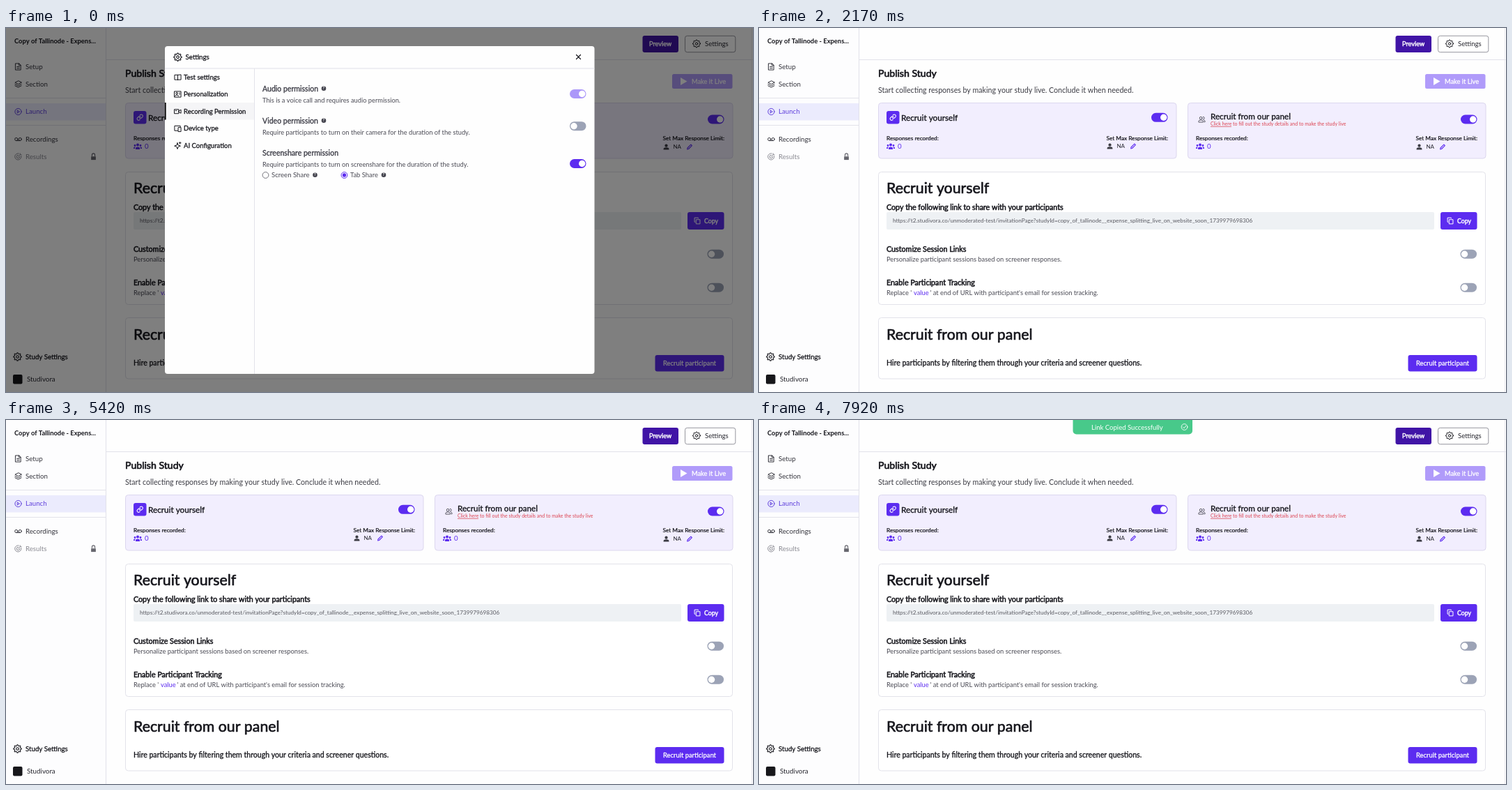
An HTML page with a canvas that plays this animation: 1072 px wide and 522 px high, repeating every 8 s.

```html
<!DOCTYPE html>
<html lang="en">
<head>
<meta charset="utf-8">
<title>Publish study</title>
<style>
html, body { margin: 0; width: 100%; height: 100%; overflow: hidden; background: #fff; }
canvas { display: block; width: 1072px; height: 522px; }
</style>
</head>
<body>
<canvas id="stage"></canvas>
<script>
const W = 1072, H = 522, LOOP = 8000, STEP = 1000 / 12;
const CLOSE_AT = 1500, COPY_AT = 6750, CLICK_MS = 330, TOAST_AT = 6795, TOAST_MS = 280;
const PURPLE = '#5c2cf0', INK = '#16161c', BODY = '#4a4a54', GREY = '#9ca3b6', LINE = '#e2e2ea';
const MEDIUM = 0.03, SEMI = 0.05;

const canvas = document.getElementById('stage');
const ctx = canvas.getContext('2d');
const ratio = window.devicePixelRatio || 1;
canvas.width = W * ratio;
canvas.height = H * ratio;

const ring = (x, y, r) => `M${x + r} ${y}a${r} ${r} 0 1 1 ${-2 * r} 0a${r} ${r} 0 1 1 ${2 * r} 0z`;

function gearPath() {
  let d = '';
  for (let i = 0; i < 32; i++) {
    const r = i % 4 < 2 ? 11 : 8.3;
    const a = (i - 0.5) * Math.PI / 16;
    d += `${i ? 'L' : 'M'}${12 + r * Math.cos(a)} ${12 + r * Math.sin(a)}`;
  }
  return d + 'z' + ring(12, 12, 3.5);
}

// Icon outlines on a 24 unit grid
const ICONS = {
  gear: gearPath(),
  doc: 'M4 2h11l5 5v15H4zM14 2v6h6M8 12h8M8 17h8',
  layers: 'M12 2L2 7l10 5 10-5zM2 12l10 5 10-5M2 17l10 5 10-5',
  launch: ring(12, 12, 10) + 'M10 8l6 4-6 4z',
  tape: ring(6, 12, 4.5) + ring(18, 12, 4.5) + 'M6 16.5h12',
  target: 'M21.5 10a10 10 0 1 1-8-8M17 12a5 5 0 1 1-5-5M12 12l7-7M18 2v4h4',
  shackle: 'M7 11V7a5 5 0 0 1 10 0v4',
  lockBody: 'M3 10h18v13H3z',
  link: 'M10 13a5 5 0 0 0 7.5.5l3-3a5 5 0 0 0-7-7l-1.7 1.7M14 11a5 5 0 0 0-7.5-.5l-3 3a5 5 0 0 0 7 7l1.7-1.7',
  group: ring(12, 7, 4) + ring(4, 9, 2.8) + ring(20, 9, 2.8) +
    'M6 20v-3q0-4 6-4t6 4v3zM0 18v-2q0-3 4-3h1q-1 2-1 5zM24 18v-2q0-3-4-3h-1q1 2 1 5z',
  pair: ring(9, 8, 4) + 'M2 20v-2q0-4 7-4t7 4v2zM16 4a4 4 0 0 1 0 8M18 14q4 1 4 4v2h-3',
  person: ring(12, 7, 6) + 'M1 23v-3q0-6 11-6t11 6v3z',
  pencil: 'M17 3l4 4L8 20l-5 1 1-5z',
  copy: 'M9 8h12v14H9zM5 16H3V2h12v2',
  cross: 'M4 4l16 16M20 4L4 20',
  book: 'M12 5H2v15h9l1 1 1-1h9V5zM12 5v16',
  badge: 'M2 3h20v18H2zM17 8h2M17 12h2' + ring(9, 9, 3) + 'M4 18q0-4 5-4t5 4',
  camera: 'M2 6h13v13H2zM15 11l7-4v11l-7-4zM5 10h3',
  devices: 'M12 19H2V4h18v3M14 9h8v13h-8z',
  sparkle: 'M11 4l2.5 7 7 2.5-7 2.5-2.5 7-2.5-7-7-2.5 7-2.5zM19 1v6M16 4h6',
  play: 'M3 1l19 11L3 23z',
  done: ring(12, 12, 10) + 'M7 12l4 4 6-8'
};

function icon(name, cx, cy, size, color, weight = 1, filled = false) {
  const k = size / 24, path = new Path2D(ICONS[name]);
  ctx.save();
  ctx.translate(cx - size / 2, cy - size / 2);
  ctx.scale(k, k);
  ctx.fillStyle = ctx.strokeStyle = color;
  ctx.lineWidth = weight / k;
  ctx.lineJoin = ctx.lineCap = 'round';
  if (filled) ctx.fill(path); else ctx.stroke(path);
  ctx.restore();
}

// y is the middle of the capitals; weight thickens the strokes, in em
function text(str, x, y, size, color = INK, weight = 0, face = '') {
  ctx.font = `${face} ${size}px Lato, "Open Sans", sans-serif`;
  ctx.fillStyle = ctx.strokeStyle = color;
  ctx.lineJoin = 'round';
  const base = y + size * 0.35;
  ctx.fillText(str, x, base);
  if (weight) {
    ctx.lineWidth = size * weight;
    ctx.strokeText(str, x, base);
  }
}

function box(x, y, w, h, r, fill, stroke) {
  ctx.beginPath();
  ctx.roundRect(x, y, w, h, r);
  if (fill) { ctx.fillStyle = fill; ctx.fill(); }
  if (stroke) { ctx.strokeStyle = stroke; ctx.lineWidth = 1; ctx.stroke(); }
}

function rect(x, y, w, h, color) {
  ctx.fillStyle = color;
  ctx.fillRect(x, y, w, h);
}

function disc(x, y, r, fill, stroke) {
  ctx.beginPath();
  ctx.arc(x, y, r, 0, 2 * Math.PI);
  if (fill) { ctx.fillStyle = fill; ctx.fill(); }
  if (stroke) { ctx.strokeStyle = stroke; ctx.lineWidth = 1; ctx.stroke(); }
}

function toggle(x, y, on, color = on ? PURPLE : GREY) {
  box(x, y - 6.5, 23.5, 13, 6.5, color);
  disc(x + (on ? 17.7 : 6), y, 4.7, '#fff');
}

function sidebar() {
  rect(0, 0, 143, H, '#fdfdfe');
  rect(143, 0, 1, H, LINE);
  rect(0, 100, 143, 1, LINE);
  rect(0, 139, 143, 1, LINE);
  rect(0, 108, 143, 24.5, '#ebebfd');
  text('Copy of Tallinode - Expens...', 12, 19, 9.4, INK, 0, 'bold');
  const rows = [
    ['doc', 'Setup', 55.5, '#34343c'], ['layers', 'Section', 80.5, '#34343c'],
    ['launch', 'Launch', 120, '#6040dc'], ['tape', 'Recordings', 159.5, '#34343c'],
    ['target', 'Results', 184.5, '#8a8a92']
  ];
  for (const [name, label, y, color] of rows) {
    icon(name, 17.5, y, 11, color);
    text(label, 28, y, 9.7, color);
  }
  icon('shackle', 125.5, 184, 10, '#66666e', 1.1);
  icon('lockBody', 125.5, 185, 9, '#66666e', 1, true);
  icon('gear', 16.5, 471.5, 12.5, INK, 1.1);
  text('Study Settings', 28, 471.5, 9.7, INK, MEDIUM);
  box(10, 497, 13.5, 13.5, 2, '#17171b');
  text('Studivora', 30, 503.5, 9.8, '#26262e');
}

function header() {
  rect(143, 45, 929, 1, LINE);
  rect(1070, 0, 1, H, '#e9e9ee');
  box(913.5, 11, 51.5, 24, 3, '#4014a6');
  text('Preview', 923, 22.5, 9.2, '#fff', SEMI);
  box(974.5, 11.3, 72.3, 23.4, 3, '#fff', '#96969e');
  icon('gear', 991, 22.5, 12, INK);
  text('Settings', 1003, 22.5, 9.65, '#26262e');
  text('Publish Study', 171, 65, 14.1, INK, SEMI);
  text('Start collecting responses by making your study live. Conclude it when needed.', 171, 89.5, 10.62, '#3c3c44');
  box(956, 66, 86.5, 21, 2.5, '#b09bfa');
  icon('play', 972.5, 76.5, 12, '#fff', 1, true);
  text('Make it Live', 984, 76.5, 9.25, '#fff', MEDIUM);
}

function card(x, toggleY, naY) {
  box(x + 0.5, 107.5, 427.5, 79.5, 4, '#f2eefe', '#dcd7ee');
  toggle(x + 392, toggleY, true);
  text('Responses recorded:', x + 12, 158.5, 8.27, INK, MEDIUM);
  icon('group', x + 18, 170, 12, PURPLE, 1, true);
  text('0', x + 28, 170, 9.7, PURPLE);
  text('Set Max Response Limit:', x + 327.5, 158, 8.25, INK, MEDIUM);
  icon('person', x + 332.5, naY, 8.5, '#3c3c44', 1, true);
  text('NA', x + 342.5, naY - 0.5, 8, '#26262e');
  icon('pencil', x + 366, naY, 9, PURPLE, 1.1);
}

function cards() {
  card(171, 128.3, 169.5);
  box(183, 119, 18.5, 18.5, 3, PURPLE);
  icon('link', 192.2, 128.2, 10.5, '#fff', 1.1);
  text('Recruit yourself', 204, 128.5, 11.75, INK, MEDIUM);
  card(615, 131, 170.5);
  icon('pair', 635.5, 131, 11, '#4a4a54', 0.9);
  text('Recruit from our panel', 648, 126.5, 11.7, INK, MEDIUM);
  const red = '#dc4450';
  text('Click here to fill out the study details and to make the study live', 648, 138, 6.99, red);
  rect(648, 141, 30, 0.7, red);
}

function option(title, note, y) {
  text(title, 183, y, 10.72, INK, SEMI);
  if (note) text(note, 183, y + 14, 9.33, BODY);
  toggle(1006.5, y + 6.7, false);
}

function panels() {
  box(171.5, 206.5, 871, 190, 4, '#fff', LINE);
  text('Recruit yourself', 183, 230, 21.3, INK, MEDIUM);
  text('Copy the following link to share with your participants', 183, 257.5, 10.69, INK, SEMI);
  box(183, 264, 786, 25, 2, '#eef1f4');
  text('https://t2.studivora.co/unmoderated-test/invitationPage?studyId=copy_of_tallinode__expense_splitting_live_on_website_soon_1739979698306',
    192, 276, 8.19, '#5a5a62');
  box(978, 264, 52.5, 25, 3, PURPLE);
  icon('copy', 992, 276.5, 10.5, '#fff');
  text('Copy', 1002, 276.5, 8.8, '#fff', SEMI);
  option('Customize Session Links', 'Personalize participant sessions based on screener responses.', 317.5);
  option('Enable Participant Tracking', '', 365.5);
  text("Replace '", 183, 379.5, 9.33, BODY);
  text('value', 222, 379.5, 9.33, PURPLE);
  text("' at end of URL with participant's email for session tracking.", 245.5, 379.5, 9.33, BODY);

  box(171.5, 415.5, 871, 87.5, 4, '#fff', LINE);
  text('Recruit from our panel', 183, 439.5, 21.3, INK, MEDIUM);
  text('Hire participants by filtering them through your criteria and screener questions.', 183, 480.5, 10.57, INK, MEDIUM);
  box(931.5, 469, 99, 23.5, 3, PURPLE);
  text('Recruit participant', 943, 481, 9.38, '#fff', MEDIUM);
}

function info(x, y) {
  disc(x, y, 3.3, '#45454f');
  text('?', x - 1.2, y, 5, '#fff', MEDIUM);
}

function permission(title, note, y, toggleY, on, color) {
  text(title, 368, y, 10.55, '#3a3a44', MEDIUM);
  text(note, 368, y + 16.3, 9.29, BODY);
  toggle(809, toggleY, on, color);
}

function modal() {
  rect(0, 0, W, H, 'rgba(0,0,0,.5)');
  box(228, 26, 616.5, 470, 4, '#fefefe');
  rect(228, 57.5, 616.5, 1, LINE);
  rect(356, 58, 1, 438, LINE);
  rect(228, 107, 128, 24.5, '#f5f5f7');
  rect(228, 107, 1.6, 24.5, '#000');
  icon('gear', 246.5, 41.7, 12.5, INK, 1.1);
  text('Settings', 257.5, 42, 9.8, INK, MEDIUM);
  icon('cross', 821.5, 41.5, 9, INK, 1.2);
  const tabs = [['book', 'Test settings'], ['badge', 'Personalization'], ['camera', 'Recording Permission'],
    ['devices', 'Device type'], ['sparkle', 'AI Configuration']];
  tabs.forEach(([name, label], i) => {
    const y = 70.5 + i * 24.5;
    icon(name, 246.5, y, 11, INK);
    text(label, 255, y, 9.53, INK, MEDIUM);
  });
  permission('Audio permission', 'This is a voice call and requires audio permission.', 87, 94.5, true, '#ab97f9');
  permission('Video permission', 'Require participants to turn on their camera for the duration of the study.', 133, 140.7, false);
  permission('Screenshare permission', 'Require participants to turn on screenshare for the duration of the study.', 179, 194.5, true);
  info(456, 86.7);
  info(456, 132.7);
  disc(372.5, 211, 4.4, '#fff', '#74747c');
  text('Screen Share', 381, 211, 9.6, BODY);
  info(443.5, 210.7);
  disc(485.5, 211, 4.4, '#fff', PURPLE);
  disc(485.5, 211, 2.7, PURPLE);
  text('Tab Share', 494, 211, 9.4, BODY);
  info(542, 210.7);
}

function click(x, y, age) {
  if (age < 0 || age >= CLICK_MS) return;
  ctx.globalAlpha = Math.min(1, (CLICK_MS - age) / 150);
  disc(x, y, 14.5, 'rgba(214,60,140,.27)', '#c03c80');
  ctx.globalAlpha = 1;
}

function toast(age) {
  if (age < 0) return;
  const eased = 1 - (1 - Math.min(1, age / TOAST_MS)) ** 3;
  ctx.save();
  ctx.globalAlpha = Math.min(1, eased * 1.08);
  ctx.translate(0, -25 * (1 - eased));
  box(450.5, -10, 171.5, 30.5, 5, '#48c98a');
  text('Link Copied Successfully', 477, 10.5, 9.55, '#fff');
  icon('done', 610.5, 10, 10.5, '#fff', 0.9);
  ctx.restore();
}

function draw(now) {
  const t = Math.floor((now % LOOP + 4) / STEP) * STEP + 0.01;
  ctx.setTransform(ratio, 0, 0, ratio, 0, 0);
  rect(0, 0, W, H, '#fefefe');
  sidebar();
  header();
  cards();
  panels();
  if (t < CLOSE_AT) modal();
  click(823.8, 47.8, t - CLOSE_AT);
  click(993.5, 278, t - COPY_AT);
  toast(t - TOAST_AT);
}

const start = performance.now();
function frame() {
  draw(performance.now() - start);
  requestAnimationFrame(frame);
}
frame();
</script>
</body>
</html>
```
